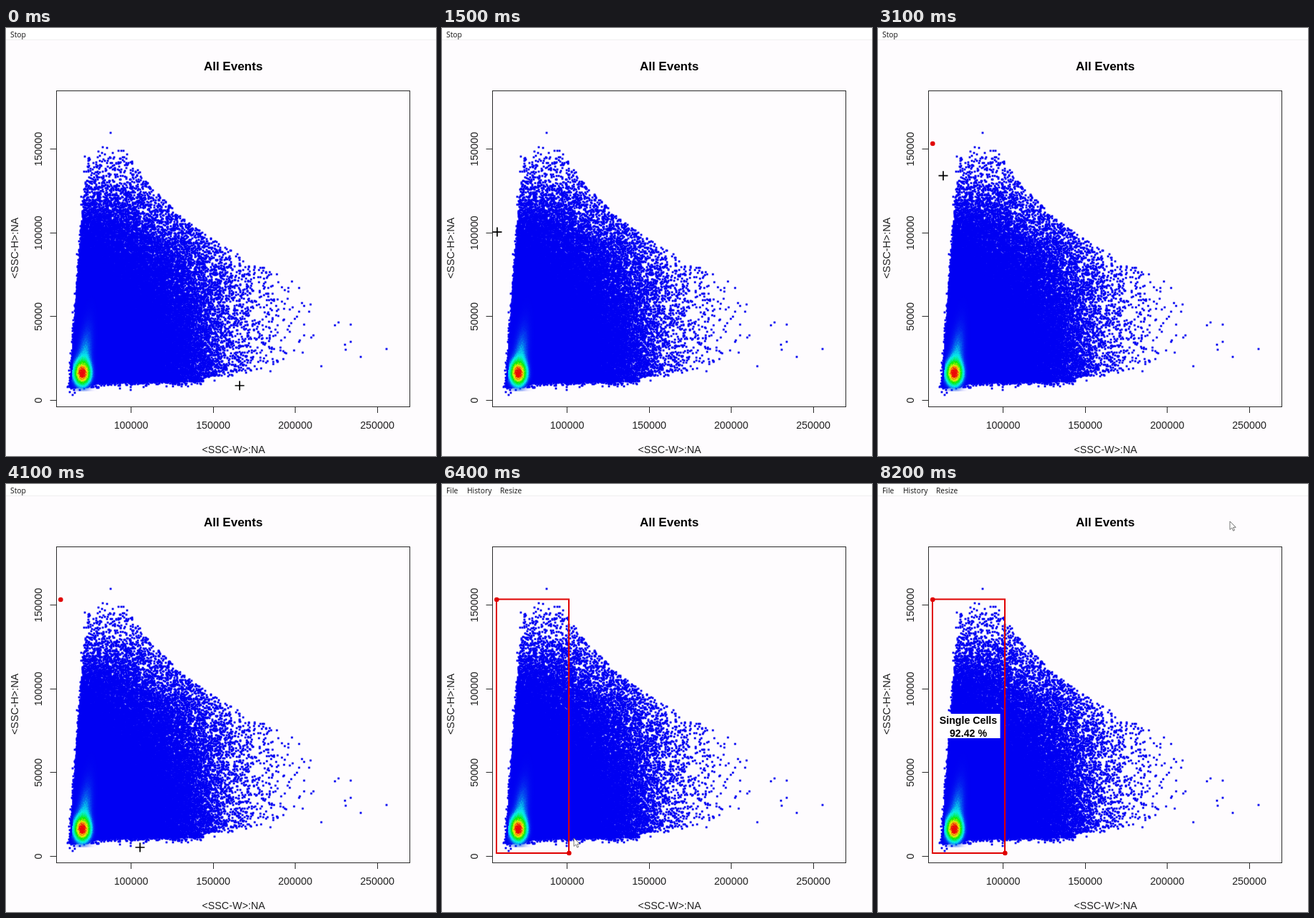
An HTML page with a canvas that plays this animation: 600 by 596 pixels, repeating every 8.3 s.

```html
<!DOCTYPE html>
<html lang="en">
<head>
<meta charset="utf-8">
<title>Gating</title>
<style>
  html, body { margin: 0; width: 100%; height: 100%; overflow: hidden; background: #fefcfe; }
  canvas, svg { position: absolute; left: 0; top: 0; width: 600px; height: 596px; }
  text { font: 14.3px "Liberation Sans", Arial, sans-serif; fill: #222; text-anchor: middle; }
  .title { font-size: 17px; font-weight: bold; fill: #000; }
  .menu text { font: 10.3px "Open Sans", sans-serif; text-anchor: start; fill: #111; }
  .label text { font-size: 14.2px; font-weight: bold; fill: #000; }
  .axes { fill: none; stroke: #2a2a2a; }
</style>
</head>
<body>
<canvas id="plot" width="600" height="596"></canvas>
<svg viewBox="0 0 600 596">
  <path d="M0 0H600V16H0Z" fill="#fff"/>
  <path d="M0 16.5H600" stroke="#f0eff0"/>
  <g class="menu" id="busy"><text x="6" y="12.5">Stop</text></g>
  <g class="menu" id="idle">
    <text x="6" y="12.5">File</text><text x="35" y="12.5">History</text><text x="81" y="12.5">Resize</text>
  </g>
  <text class="title" x="317" y="59">All Events</text>
  <text x="317.5" y="592">&lt;SSC-W&gt;:NA</text>
  <text transform="translate(16.5 306.5) rotate(-90)">&lt;SSC-H&gt;:NA</text>
  <g id="ticks"></g>
  <rect class="axes" x="70.5" y="87.5" width="493" height="440"/>
  <circle id="start" cx="76.3" cy="161" r="3.3" fill="#e00000"/>
  <g id="gate">
    <rect x="76" y="160.5" width="101" height="353.5" fill="none" stroke="#e00000" stroke-width="2"/>
    <circle cx="177.3" cy="514" r="3.3" fill="#e00000"/>
  </g>
  <g class="label" id="label">
    <rect x="82" y="320" width="88.5" height="34" fill="#fff"/>
    <text x="126" y="334">Single Cells</text><text x="126" y="352">92.42 %</text>
  </g>
  <path id="cross" d="M-6.5 0H6.5M0 -6.5V6.5" stroke="#000" stroke-width="1.7"/>
  <path id="arrow" d="M0 0V11.5L2.8 9L4.7 13.2L6.5 12.4L4.7 8.3H8.3Z" fill="#fff" stroke="#666" stroke-width=".9"/>
</svg>
<script>
const $ = id => document.getElementById(id);
const { exp, max, min, floor } = Math;
const LOOP = 8300, STEP = 100;
const FIRST_CLICK = 2500, SECOND_CLICK = 4600, NAMED = 7000;

// Data to stage coordinates
const px = w => w / 50000 * 114.5 - 54.5;
const py = h => 518.5 - h / 50000 * 116.6;

function drawTicks() {
  let out = '';
  for (let w = 100000; w <= 250000; w += 50000) {
    const x = px(w);
    out += `<path class="axes" d="M${floor(x) + 0.5} 527.5v8.5"/><text x="${x}" y="557.5">${w}</text>`;
  }
  for (let h = 0; h <= 150000; h += 50000) {
    const y = py(h);
    out += `<path class="axes" d="M70 ${floor(y) + 0.5}h-8.5"/><text transform="translate(50 ${y}) rotate(-90)">${h}</text>`;
  }
  $('ticks').innerHTML = out;
}

let seed = 7;
function random() {
  seed = (seed * 1664525 + 1013904223) >>> 0;
  return seed / 4294967296;
}

const leftEdge = y => 91 + (490 - y) * 0.07;
const bottomEdge = x => x < 135 ? 499 - (x - 90) * 0.14 : x < 276 ? 492 : 486 - (x - 276) * 0.12;

// Chance that an event lands on this pixel
function density(x, y) {
  const u = (x + 54.5) * (518.5 - y) / 76850; // area limit at u = 1
  if (u > 1) return 0;
  const wide = exp((250 - x) / 30) + 0.0012 * exp((400 - x) / 60);
  const tall = exp((y - 262) / 25 - max(0, 185 - y) / 18);
  const rim = exp(-1.8 + 5 * (1 - u));
  const inside = 1 / (1 / wide + 1 / tall + 1 / rim + 0.8);
  return inside * exp(-max(0, y - bottomEdge(x)) / 2 - max(0, leftEdge(y) - x));
}

// Dense core with a leaning plume above it
function heat(x, y) {
  const up = 480 - y, dx = x - 106;
  const core = exp(-dx * dx / 98 - up * up / 220);
  const lean = dx - max(0, up) * 0.12;
  const plume = 0.22 * exp(-up * up / (up > 0 ? 3500 : 150) - lean * lean / 110);
  return core + plume * (1 - core);
}

function drawPlot() {
  const c = $('plot').getContext('2d');
  c.fillStyle = '#0000f2';
  for (let y = 100; y < 512; y++)
    for (let x = 86; x < 548; x++)
      if (random() < density(x, y)) c.fillRect(x - 1.4, y - 1.4, 2.8, 2.8);

  for (let y = 350; y < 506; y++)
    for (let x = Math.ceil(leftEdge(y)); x < 145; x++) {
      const v = heat(x, y) * (0.9 + 0.2 * random());
      c.globalAlpha = min(1, v * 6);
      c.fillStyle = `hsl(${240 * max(0, 1 - v * 1.1)} 94% 48%)`;
      c.fillRect(x, y, 1, 1);
    }
}

// Pointer stops: time, x, y
const stops = [
  [0, 326, 498], [1000, 71, 434], [2000, 83, 160], [2400, 76, 161], [2800, 76, 161],
  [4100, 187, 506], [4500, 177, 514], [5000, 177, 496], [6400, 184, 493],
  [8200, 491, 52], [LOOP, 491, 52]
];

// Monotone cubic through the stops: flows through them, rests where it turns back
function slope(i, axis) {
  const rate = k => (stops[k + 1][axis] - stops[k][axis]) / (stops[k + 1][0] - stops[k][0]);
  if (i === 0 || i === stops.length - 1) return 0;
  const a = rate(i - 1), b = rate(i);
  return a * b > 0 ? 2 * a * b / (a + b) : 0;
}

function pointerAt(t, axis) {
  const i = stops.findIndex(s => s[0] > t) - 1;
  const p = stops[i], q = stops[i + 1], span = q[0] - p[0];
  const k = (t - p[0]) / span, r = 1 - k;
  return p[axis] * r * r * (1 + 2 * k) + q[axis] * k * k * (1 + 2 * r)
    + span * k * r * (slope(i, axis) * r - slope(i + 1, axis) * k);
}

const show = (id, on) => { $(id).style.visibility = on ? 'visible' : 'hidden'; };

function render(now) {
  const t = floor(now % LOOP / STEP) * STEP;
  const done = t >= SECOND_CLICK;
  show('busy', !done);
  show('idle', done);
  show('start', t >= FIRST_CLICK);
  show('gate', done);
  show('label', t >= NAMED);
  show('cross', !done);
  show('arrow', done);
  $(done ? 'arrow' : 'cross').setAttribute('transform', `translate(${pointerAt(t, 1)} ${pointerAt(t, 2)})`);
}

drawTicks();
drawPlot();
const begin = performance.now();
function tick() {
  render(performance.now() - begin);
  requestAnimationFrame(tick);
}
tick();
</script>
</body>
</html>
```
